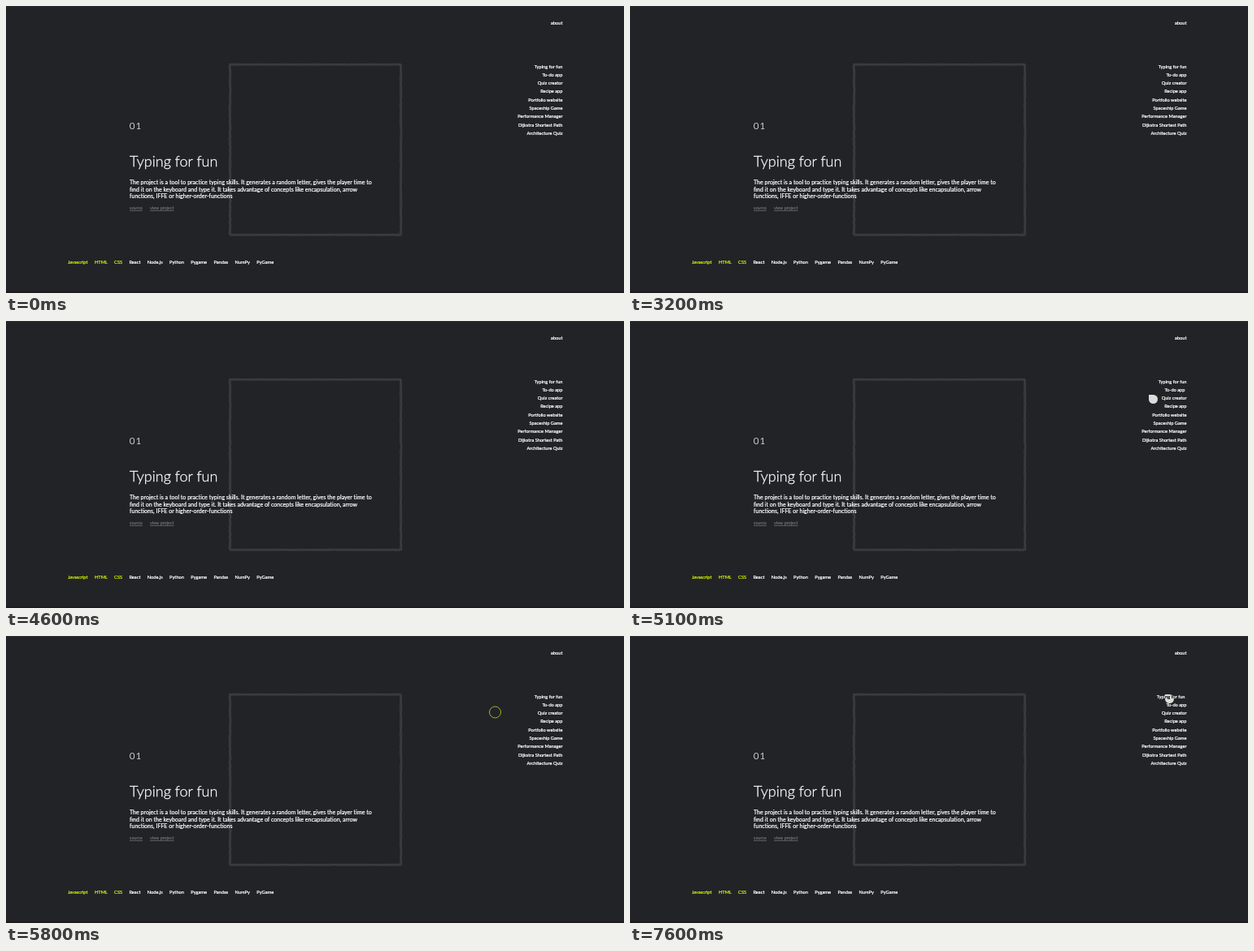
Animation of 760 by 354 pixels, one loop 8000 ms. Source, as an HTML page:

```html
<!DOCTYPE html>
<html lang="en">
<head>
<meta charset="utf-8">
<title>Projects</title>
<style>
  html, body { margin: 0; width: 100%; height: 100%; overflow: hidden; background: #222327; }
  svg { display: block; width: 760px; height: 354px; isolation: isolate; }
  text { font: 400 5.7px Lato, "Open Sans", sans-serif; fill: #fff; stroke: #fff; stroke-width: 0.22px; }
  .number { font-size: 11px; font-weight: 300; letter-spacing: 1.3px; }
  .title { font-size: 18px; font-weight: 300; stroke-width: 0.3px; }
  .body { font-size: 7.06px; }
  .link { font-size: 5.5px; fill: #8b8c8f; stroke: none; text-decoration: underline; }
  .used { fill: #d4f205; stroke: #d4f205; }
  .nav { text-anchor: end; }
  #sketch path { fill: none; }
  #ring { fill: none; stroke: #a5b020; }
  #drop { fill: #fff; mix-blend-mode: difference; }
</style>
</head>
<body>
<svg id="stage" viewBox="0 0 760 354">
  <rect width="760" height="354" fill="#222327"/>
  <rect width="760" height="1" fill="#2b2c30"/>
  <rect y="352" width="760" height="2" fill="#1e1b1f"/>
  <g id="sketch"></g>
  <g id="copy"></g>
  <g id="pointer">
    <circle id="ring" r="7"/>
    <path id="drop" d="M-5.5 -5.5H0A5.5 5.5 0 1 1 -5.5 0Z"/>
  </g>
</svg>
<script>
const LOOP = 8000, STEP = 100;
const $ = id => document.getElementById(id);

function add(parent, tag, attrs, content = '') {
  const el = document.createElementNS('http://www.w3.org/2000/svg', tag);
  for (const key in attrs) el.setAttribute(key, attrs[key]);
  el.textContent = content;
  parent.append(el);
  return el;
}
const label = (x, y, content, cls = '') => add($('copy'), 'text', { x, y, class: cls }, content);

// Hand-drawn square: a soft band with rough lighter edges
let seed = 7;
const random = () => (seed = seed * 16807 % 2147483647) / 2147483647;

function roughSquare(inset, jitter, color, width) {
  const left = 275.6 + inset, top = 72.2 + inset, size = 210 - 2 * inset;
  const points = [];
  for (let side = 0; side < 4; side++) {
    for (let d = 0; d < size; d += 2) {
      const upright = side % 2;
      const wobble = (random() * 2 - 1) * jitter * (upright ? 1 : 0.35);
      const along = side < 2 ? d : size - d;
      const across = (side === 1 || side === 2 ? size : 0) + wobble;
      const [x, y] = upright ? [across, along] : [along, across];
      points.push(`${(left + x).toFixed(1)} ${(top + y).toFixed(1)}`);
    }
  }
  add($('sketch'), 'path', { d: `M${points.join('L')}Z`, stroke: color, 'stroke-width': width });
}
roughSquare(0, 0.5, '#36373b', 2.6);
roughSquare(-0.7, 0.9, '#434447', 0.7);
roughSquare(0.9, 0.8, '#3e3f42', 0.6);

// Copy
label(152, 152, '01', 'number');
label(152, 198, 'Typing for fun', 'title');
[
  'The project is a tool to practice typing skills. It generates a random letter, gives the player time to',
  'find it on the keyboard and type it. It takes advantage of concepts like encapsulation, arrow',
  'functions, IFFE or higher-order-functions'
].forEach((line, i) => label(152, 219.6 + i * 8.9, line, 'body'));
label(152, 251, 'source', 'link');
label(177, 251, 'view project', 'link');

const skills = label(76, 317.6, '');
'Javascript HTML CSS React Node.js Python Pygame Pandas NumPy PyGame'.split(' ').forEach((name, i) =>
  add(skills, 'tspan', { dx: i ? 8.4 : 0, class: i < 3 ? 'used' : '' }, name));

const RIGHT = 684.5;
label(RIGHT, 23.2, 'about', 'nav');
const items = [
  'Typing for fun', 'To-do app', 'Quiz creator', 'Recipe app', 'Portfolio website',
  'Spaceship Game', 'Performance Manager', 'Dijkstra Shortest Path', 'Architecture Quiz'
].map((name, i) => label(RIGHT, 76.5 + i * 10.3, name, 'nav'));

// Pointer: a brief dip in from the lower right, then an eased tour of the list
const tour = [
  { t: 4700, x: 672, y: 140 },
  { t: 5100, x: 643.5, y: 96.5 },
  { t: 5800, x: 601.5, y: 94 },
  { t: 6300, x: 690, y: 67 },
  { t: 6600, x: 658.5, y: 69 },
  { t: 7300, x: 663.5, y: 77.5 }
];
const ease = k => (1 - Math.cos(Math.PI * k)) / 2;

function pointerAt(t) {
  if (t >= 3700 && t <= 4500) {
    const reach = Math.sin(Math.PI * (t - 3700) / 800);
    return [746 - 11 * reach, 352 - 87 * reach];
  }
  if (t < tour[0].t) return null;
  const i = tour.findIndex(p => p.t > t);
  const to = tour.at(i), from = i < 0 ? to : tour[i - 1];
  const k = i < 0 ? 1 : ease((t - from.t) / (to.t - from.t));
  return [from.x + (to.x - from.x) * k, from.y + (to.y - from.y) * k];
}

function hoveredItem(t) {
  if (t >= 7000) return items[0];
  return t >= 4800 && t < 5200 ? items[1] : null;
}

function draw(t) {
  const point = pointerAt(t), hovered = hoveredItem(t);
  $('pointer').style.display = point ? '' : 'none';
  if (point) {
    for (const id of ['ring', 'drop']) $(id).setAttribute('transform', `translate(${point})`);
  }
  $('ring').style.display = hovered ? 'none' : '';
  $('drop').style.display = hovered ? '' : 'none';
  for (const item of items) item.setAttribute('x', item === hovered ? RIGHT - 2 : RIGHT);
}

const start = performance.now();
function frame() {
  const t = (performance.now() - start) % LOOP;
  draw(Math.floor(t / STEP) * STEP);
  requestAnimationFrame(frame);
}
frame();
</script>
</body>
</html>
```
